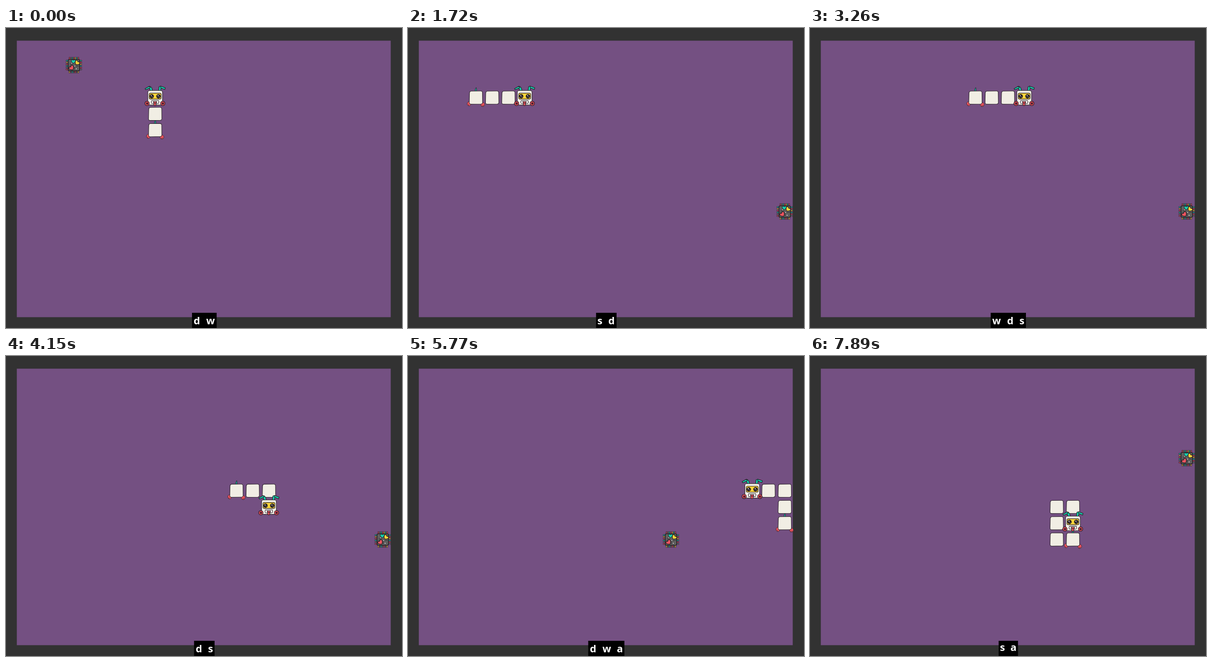
An HTML page for the animation above (8000 ms loop, 860x651 px).

```html
<!DOCTYPE html>
<html lang="en">
<head>
<meta charset="utf-8">
<title>Robot snake</title>
<style>
html, body { margin: 0; width: 100%; height: 100%; overflow: hidden; background: #323232; }
svg { display: block; }
text { font: bold 22px "Open Sans", "Noto Sans", sans-serif; fill: #fff; text-anchor: middle; }
</style>
</head>
<body>
<svg width="860" height="651" viewBox="0 0 860 651">
  <defs>
    <path id="block" d="M-10-14.2 10.5-14.4Q14-14.4 14.2-11L14.5 10Q14.6 13.6 11 13.9L-10.5 14.2Q-14.4 14.3-14.4 10.5L-13.9-10Q-13.7-14-10-14.2Z"
      fill="#f1eee4" stroke="#2a2229" stroke-width="1.1"/>
    <g id="tail" stroke="#2a2229" stroke-width=".8">
      <path d="M-2-14Q-2-19 .6-22.2 2.2-18 1.5-14Z" fill="#12a58f"/>
      <g fill="#ef5560">
        <ellipse cx="-14.8" cy="13.3" rx="4" ry="4.6"/>
        <ellipse cx="14.7" cy="14.9" rx="4.2" ry="4.5"/>
      </g>
      <path d="M-16 14.5v3M13.5 16.5v2.5M16 16v2.5" fill="none"/>
      <use href="#block"/>
    </g>
    <g id="head" stroke="#211b20" stroke-width="1.1" stroke-linejoin="round">
      <g fill="#16cfae">
        <path d="M-10-15-13.6-21.5-10.5-24.6-7.2-21-5.8-15Z"/>
        <path d="M-22-19.5-12.5-25-10.5-21.5-20.5-17.2Z"/>
        <path d="M7.5-15 8.4-23.6 12-25.2 13.4-22 11.5-15Z"/>
        <path d="M12.2-25 22-21.5 21-17.6 12-21.2Z"/>
      </g>
      <rect x="-16" y="-15.4" width="32" height="31.4" rx="4" fill="#f3f0e8"/>
      <rect x="-13" y="-9.8" width="26" height="13" rx="3" fill="#fbd43b"/>
      <g id="eye">
        <circle cx="-7.6" cy="-3" r="4.2" fill="#2b2428"/>
        <circle cx="-8.4" cy="-4.4" r="1.1" fill="#fff" stroke="none"/>
        <circle cx="-6" cy="-1.6" r=".7" fill="#bbb" stroke="none"/>
      </g>
      <use href="#eye" x="14.8"/>
      <path d="M-7.6 6.4H7.4Q9 12.6 5.5 12.8H-6.5Q-9.5 12.6-7.6 6.4Z" fill="#fff"/>
      <path d="M-4.4 8.6H3.6L3 11.6H2V16.3Q-.8 18.2-3 16.3V11.6Z" fill="#ef5560"/>
      <path d="M-3 11.6H2" fill="none"/>
      <g id="ear">
        <circle cx="-17.5" cy="12.5" r="4.8" fill="#e84e5c"/>
        <circle cx="-17.3" cy="12.7" r="2.1" fill="#5a2530" stroke-width=".8"/>
      </g>
      <use href="#ear" x="34"/>
    </g>
    <path id="heart" d="M0 4.2C-8-1-3.5-6 0-2.3 3.5-6 8-1 0 4.2Z"/>
    <g id="chip" stroke="#1f1a1f" stroke-width="1">
      <g id="pins" stroke-width=".8"></g>
      <rect x="-12.4" y="-12.4" width="24.8" height="24.8" rx="2.5" fill="#606060" stroke-width="1.4"/>
      <path d="M-9-3-4 0-1-3M4 2h7M-10 3l3-3M1 10V4" fill="none" stroke="#302c30"/>
      <use href="#heart" x="-1" y="-8" fill="#16cfae"/>
      <use href="#heart" transform="translate(7 -5) rotate(40) scale(1.15)" fill="#fbd43b"/>
      <use href="#heart" transform="translate(-5 6) rotate(-40) scale(1.2)" fill="#ef5560"/>
      <g fill="#fff" stroke-width=".7">
        <circle cx="2" cy="2" r="1.4"/><circle cx="5.2" cy="8" r="1.5"/><circle cx="-5" cy="-4" r="1.3"/>
      </g>
    </g>
  </defs>
  <rect width="860" height="651" fill="#323232"/>
  <rect x="23.5" y="27.5" width="812" height="600" fill="#745082"/>
  <use id="food" href="#chip"/>
  <g id="snake"></g>
  <rect id="plate" y="618" height="33" fill="#000"/>
  <g id="keys"></g>
</svg>
<script>
const LOOP = 8000, CELL = 35.3, KEY_LIFE = 820, KEY_GAP = 12, MAX_LEN = 6;
const NS = "http://www.w3.org/2000/svg";
const el = id => document.getElementById(id);
const make = (parent, tag, attrs = {}) => {
  const node = parent.appendChild(document.createElementNS(NS, tag));
  set(node, attrs);
  return node;
};
function set(node, attrs) {
  for (const name in attrs) node.setAttribute(name, attrs[name]);
}

// Chip pins: a row per side, colours cycling
const pinColors = ["#ef5560", "#8a8a8a", "#16cfae", "#ef5560", "#fbd43b", "#16cfae"];
for (let side = 0; side < 4; side++) {
  const row = make(el("pins"), "g", { transform: `rotate(${side * 90})` });
  const count = side % 2 ? 6 : 7;
  for (let i = 0; i < count; i++) {
    const fill = side === 2 && i % 2 ? "#777" : pinColors[(i + side * 2) % 6];
    make(row, "rect", { x: -10.6 + i * 19.2 / (count - 1), y: -17.2, width: 2.1, height: 5, rx: .7, fill });
  }
}

// Runs of moves: [start ms, interval ms, count]
const runs = [[100, 115, 7], [920, 100, 2], [1130, 110, 3], [1520, 112.8, 8], [2410, 115, 7],
  [3230, 112.8, 8], [4150, 115, 7], [4940, 118, 7], [5770, 112.8, 8], [6660, 120, 6]];
const times = runs.flatMap(([start, step, count]) =>
  Array.from({ length: count }, (_, i) => start + i * step));

const route = "w3 a5 s3 d7 s2 a2 w2 d4 s4 d3 s2 d5 s1 d2 w3 a3 s3 a5 w2 d1 s1"
  .split(" ").map(leg => leg[0].repeat(leg[1])).join("");
const dirs = { w: [0, -1], a: [-1, 0], s: [0, 1], d: [1, 0] };
const foods = [[3, 1], [22, 10], [15, 10], [22, 5]];

function simulate() {
  let body = [[8, 3], [8, 4], [8, 5]], eaten = 0, grow = false;
  const states = [{ time: 0, body, food: foods[0] }];
  [...route].forEach((key, i) => {
    const [dx, dy] = dirs[key], [x, y] = body[0];
    const head = [x + dx, y + dy];
    body = [head, ...(grow ? body : body.slice(0, -1))];
    grow = String(head) === String(foods[eaten]);
    if (grow) eaten++;
    states.push({ time: times[i], body, food: foods[eaten] });
  });
  return states;
}
const states = simulate();

// Key presses: [key, ms]
const presses = [["d", -500], ["w", -150], ["a", 420], ["s", 920], ["d", 1300], ["s", 2080], ["a", 2400],
  ["w", 2600], ["d", 2840], ["s", 3230], ["d", 3770], ["s", 4120], ["d", 4330], ["s", 4940], ["d", 5030],
  ["w", 5230], ["a", 5570], ["s", 5960], ["a", 6270], ["w", 6870], ["d", 7070], ["s", 7210], ["a", 7430]];
const keyWidth = { a: 13, s: 11, d: 15.5, w: 20 };

const segments = Array.from({ length: MAX_LEN }, () => make(el("snake"), "use"));
const letters = Array.from({ length: 5 }, () => make(el("keys"), "text"));

const place = (node, [col, row]) =>
  set(node, { x: 23.9 + (col + .5) * CELL, y: 27.6 + (row + .5) * CELL });

function drawSnake({ body, food }) {
  place(el("food"), food);
  // The last element is the head, so that it lies on top
  segments.forEach((node, i) => {
    const k = MAX_LEN - 1 - i;
    node.style.display = k < body.length ? "" : "none";
    if (k >= body.length) return;
    set(node, { href: k === 0 ? "#head" : k === body.length - 1 ? "#tail" : "#block" });
    place(node, body[k]);
  });
}

function drawKeys(t) {
  const shown = presses.filter(([, at]) => t >= at && t < at + KEY_LIFE).map(([key]) => key);
  const width = shown.reduce((sum, key) => sum + keyWidth[key] + KEY_GAP, 6 - KEY_GAP);
  let x = 430.7 - width / 2;
  set(el("plate"), { x, width: Math.max(0, width) });
  x += 2.7;
  const y = shown.includes("d") ? 643 : 640.3;
  letters.forEach((node, i) => {
    const key = shown[i] || "";
    node.textContent = key;
    if (!key) return;
    set(node, { x: x + keyWidth[key] / 2, y });
    x += keyWidth[key] + KEY_GAP;
  });
}

function draw(t) {
  drawSnake(states.findLast(state => state.time <= t));
  drawKeys(t);
}

const start = performance.now();
function tick() {
  draw((performance.now() - start) % LOOP);
  requestAnimationFrame(tick);
}
tick();
</script>
</body>
</html>
```
